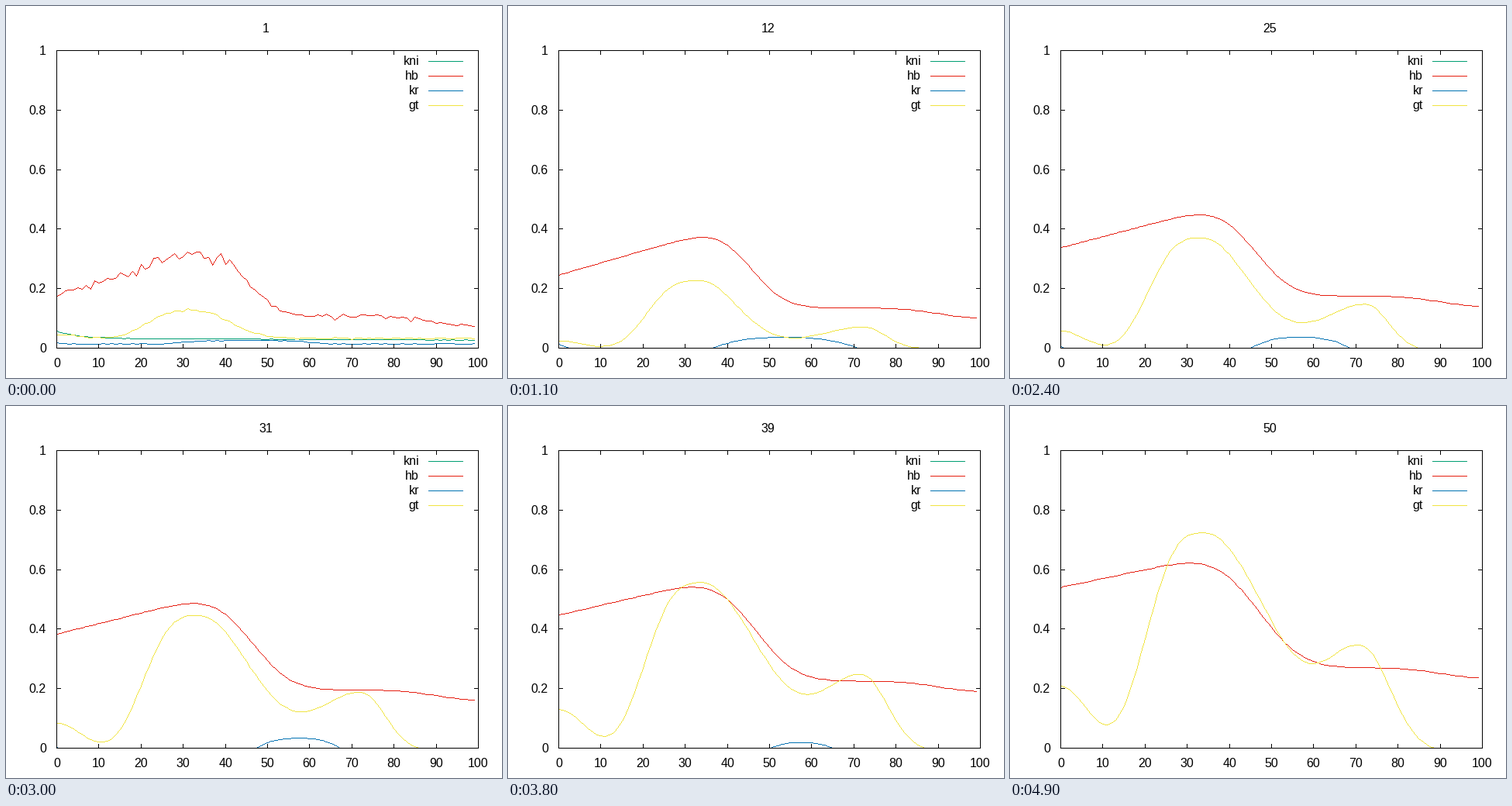
A matplotlib script that plays this animation: 640x480 px, repeating every 5000 ms.

```python
import math

import numpy as np
import matplotlib.pyplot as plt
from matplotlib.animation import FuncAnimation

FRAMES, INTERVAL = 50, 100
LEFT, RIGHT, TOP, BOTTOM = 65, 609, 57, 441
COLORS = {"kni": "#009e73", "hb": "#e51e10", "kr": "#0072b2", "gt": "#f0e442"}
ROUGHNESS = {"kni": 0.01, "hb": 0.04, "kr": 0.04, "gt": 0.03}
CELLS = np.arange(100)

erf = np.vectorize(math.erf)


def rise(x, center, width):
    """Smooth step from 0 to 1, as left by diffusion of a sharp edge."""
    return 0.5 * (1 + erf((x - center) / (width * math.sqrt(2))))


def bell(x, center, width):
    return np.exp(-((x - center) / width) ** 2 / 2)


def kni(x, n, u):
    return 0.033 - 0.00006 * x - 0.0085 * (n - 1) + 0.025 * np.exp(-x / 5)


def hb(x, n, u):
    front = 0.175 + 0.30 * u + 0.065 * u ** 2 + (0.0044 - 0.0014 * u) * x
    back = 0.107 + 0.115 * u + 0.048 * u ** 2
    border = rise(x, 44.3 + 1.9 * u, 6 + 2.2 * u)
    return front + (back - front) * border - 0.038 * rise(x, 90, 7)


def kr(x, n, u):
    peak = 0.04 * (1 - (u / 0.88) ** 5) * (1 - 0.35 * math.exp(-(n - 1) / 8))
    center = 58 - 13 * math.exp(-(n - 1) / 10)
    width = 9 + 22 * math.exp(-(n - 1) / 12)
    band = peak - 0.039 * np.abs((x - center) / width) ** 2.5
    edge = 0.02 - 0.0006 * n - 0.005 * x
    start = np.full(len(x), 0.014 - 0.006 * (n - 1))
    return np.maximum.reduce([band, edge, start])


def gt(x, n, u):
    base = 0.045 * math.exp(-(n - 1) / 8) - 0.012
    peak = 33 + u
    steep = np.exp(-(np.abs(x - peak) / (13.6 + 2.4 * u)) ** 3)
    main = np.where(x < peak, steep, bell(x, peak, 7.5 + 7.8 * u))
    second = 73 - 1.2 * u
    width = np.where(x < second, 12 - 3.5 * u, 4.2 + 2.3 * u)
    return (base + (0.128 + 0.40 * u + 0.196 * u ** 2 - base) * main
            + 0.32 * u * bell(x, second, width)
            + (0.012 + 0.207 * u ** 1.85) * bell(x, 0, 4.8 + 1.7 * u))


PROFILES = {"kni": kni, "hb": hb, "kr": kr, "gt": gt}
rng = np.random.default_rng(4)
NOISE = {name: ROUGHNESS[name] * profile(CELLS, 1, 0) * rng.normal(size=100)
         for name, profile in PROFILES.items()}


def diffuse(noise, n):
    if n == 1:
        return noise
    weights = bell(CELLS[:, None], CELLS, 0.9 * math.sqrt(n - 1))
    return max(0, 1 - (n - 1) / 8) * (weights @ noise) / weights.sum(axis=1)


def px(x):
    return np.floor(LEFT + (RIGHT - LEFT) * x / 100 + 0.5)


def py(y):
    return np.floor(BOTTOM - (BOTTOM - TOP) * y + 0.5)


def pixel_path(xs, ys):
    """Turn a polyline into one-pixel dashes, for hard-edged lines."""
    dots = []
    for x0, y0, x1, y1 in zip(xs, ys, xs[1:], ys[1:]):
        steps = int(max(abs(x1 - x0), abs(y1 - y0)))
        t = np.linspace(0, 1, steps + 1)
        dots.append([np.floor(x0 + (x1 - x0) * t + 0.5), np.floor(y0 + (y1 - y0) * t + 0.5)])
    x, y = np.hstack(dots)
    x, y = x[y < BOTTOM], y[y < BOTTOM] + 0.5
    gap = np.full(len(x), np.nan)
    return np.column_stack([x, x + 1, gap]).ravel(), np.column_stack([y, y, gap]).ravel()


plt.rcParams.update({"font.family": "Liberation Sans", "font.size": 14.4, "path.simplify": False})
fig = plt.figure(figsize=(8, 6), dpi=80, facecolor="white")
ax = fig.add_axes([0, 0, 1, 1])
ax.set(xlim=(0, 640), ylim=(480, 0))
ax.axis("off")


def stroke(xs, ys, color="black", z=5, cap="projecting"):
    line, = ax.plot(np.add(xs, 0.5), np.add(ys, 0.5), color=color, lw=0.9, zorder=z,
                    solid_capstyle=cap, solid_joinstyle="miter")
    line.set_snap(False)
    return line


def label(x, baseline, text, align):
    return ax.text(x, baseline, text, ha=align, va="baseline")


stroke([LEFT, RIGHT, RIGHT, LEFT, LEFT], [TOP, TOP, BOTTOM, BOTTOM, TOP])
for x in range(0, 101, 10):
    stroke([px(x)] * 2, [BOTTOM, BOTTOM - 5])
    stroke([px(x)] * 2, [TOP, TOP + 5])
    label(px(x) + 0.5, 466, str(x), "center")
for y in np.arange(6) / 5:
    stroke([LEFT, LEFT + 5], [py(y)] * 2)
    stroke([RIGHT, RIGHT - 5], [py(y)] * 2)
    label(52, py(y) + 6, f"{y:g}", "right")

title = label(335.5, 34, "1", "center")
curves = {}
for row, (name, color) in enumerate(COLORS.items()):
    y = 71 + 19 * row
    label(533, y + 5, name, "right")
    stroke([545, 589], [y, y], color)
    curves[name] = stroke([], [], color, 2 + row / 10, "butt")


def update(frame):
    n, u = frame + 1, frame / (FRAMES - 1)
    title.set_text(str(n))
    for name, curve in curves.items():
        level = PROFILES[name](CELLS, n, u) + diffuse(NOISE[name], n)
        curve.set_data(*pixel_path(px(CELLS), py(level)))
    return [title, *curves.values()]


anim = FuncAnimation(fig, update, frames=FRAMES, interval=INTERVAL, repeat=True, repeat_delay=0)
plt.show()
```
